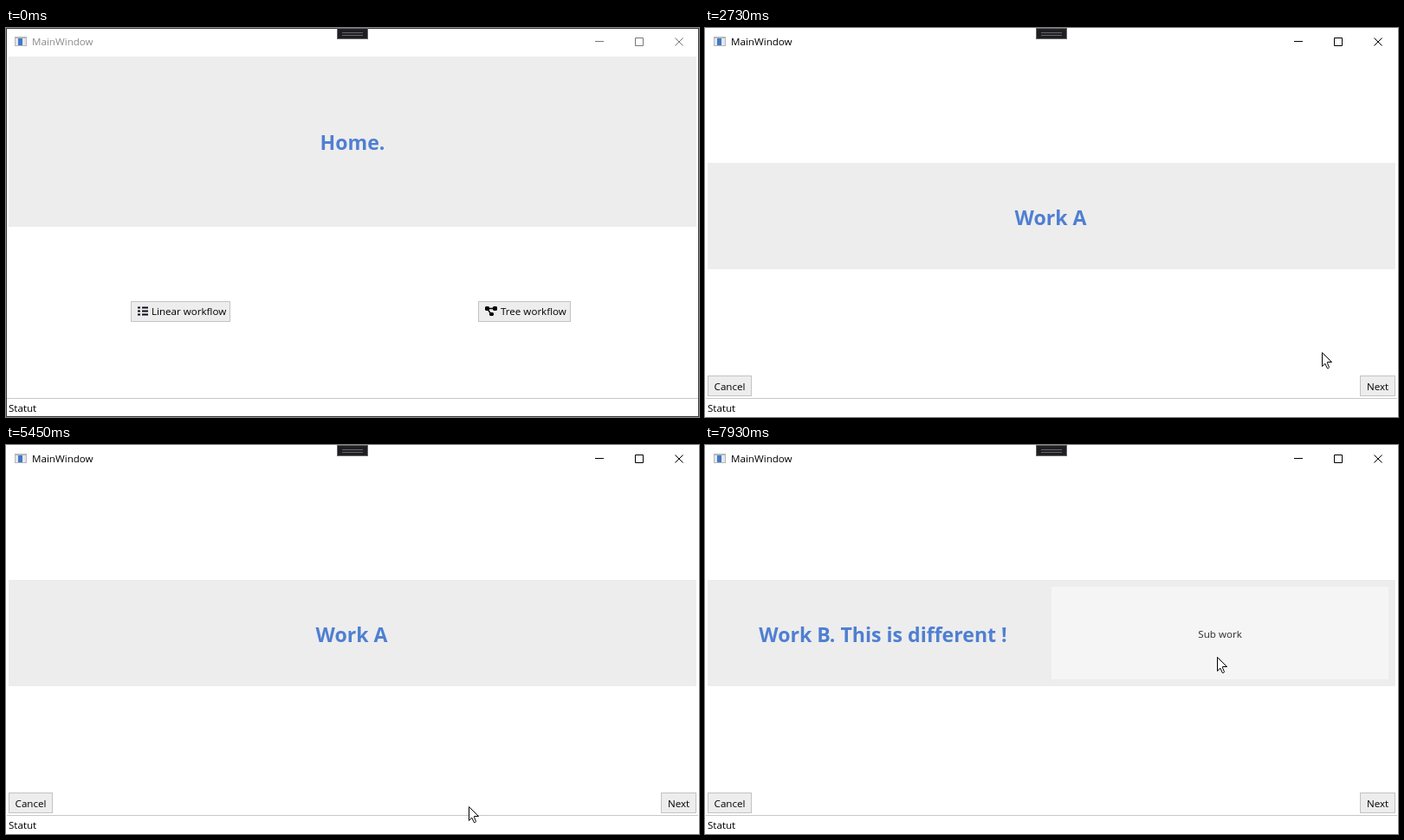
An HTML page that plays this animation: 800 by 450 pixels, repeating every 8 s.

```html
<!DOCTYPE html>
<html lang="en">
<head>
<meta charset="utf-8">
<title>Workflow demo</title>
<style>
  html, body { margin: 0; width: 100%; height: 100%; overflow: hidden; background: #fff; }
  svg { display: block; width: 800px; height: 450px; }
  text { font: 11.6px "Open Sans", "Noto Sans", sans-serif; fill: #000; }
  .mid { text-anchor: middle; }
  .head { font-size: 23.1px; font-weight: 700; fill: #4f7fd2; text-anchor: middle; }
  .panel { fill: #ededed; }
  .btn rect { fill: #ededed; stroke: #c3c3c3; }
  #sub rect { fill: #f5f5f5; }
  .btn.hover rect { fill: #fff; stroke: #4c7dcb; }
  .chrome { fill: none; stroke: #000; }
  .idle .chrome { stroke: #777; }
  .idle #title { fill: #8c8c8c; }
  #edge { display: none; fill: none; stroke: #3c3c41; }
  .idle #edge { display: inline; }
</style>
</head>
<body>
<svg id="stage" class="idle" viewBox="0 0 800 450">
  <rect width="800" height="450" fill="#fff"/>

  <!-- window frame -->
  <rect id="edge" x=".5" y=".5" width="799" height="449"/>
  <g shape-rendering="crispEdges">
    <rect x="10" y="10" width="14" height="11" fill="#b4b8bd"/>
    <rect x="11" y="12" width="12" height="8" fill="#e4e7ea"/>
    <rect x="14" y="12" width="5" height="8" fill="#4477c8"/>
  </g>
  <text id="title" x="30" y="20">MainWindow</text>
  <path class="chrome" d="M680 15.5h10M726.5 11.5h9v9h-9z"/>
  <path class="chrome" d="M772.5 11.5l9 9m0-9l-9 9"/>
  <rect x="382.5" y=".5" width="35" height="12" fill="#1f1f23" stroke="#666"/>
  <path d="M388 5.5h24M388 8.5h24" stroke="#66666a"/>
  <path d="M1 428.5h798" stroke="#c8c8c8"/>
  <text x="3" y="444">Statut</text>

  <g id="home">
    <rect class="panel" x="3" y="33" width="794" height="197"/>
    <text class="head" x="400" y="141">Home.</text>
    <g class="btn">
      <rect x="144.5" y="316.5" width="114" height="23"/>
      <path d="M152 323.5h3m2 0h7M152 327.5h3m2 0h7M152 331.5h3m2 0h7" stroke="#0c0c1c" stroke-width="2"/>
      <text x="168" y="332">Linear workflow</text>
    </g>
    <g class="btn">
      <rect x="545.5" y="316.5" width="106" height="23"/>
      <path d="M555 324.5h10M555.5 324.5l4.5 6.5" stroke="#000" stroke-width="1.4"/>
      <path d="M554 322h3l1 1v3l-1 1h-3l-1-1v-3zM563 322h3l1 1v3l-1 1h-3l-1-1v-3zM559 329h3l1 1v2l-1 1h-3l-1-1v-2z"/>
      <text x="571" y="332">Tree workflow</text>
    </g>
  </g>

  <g id="work">
    <rect class="panel" x="3" y="156" width="794" height="123"/>
    <g class="btn">
      <rect x="3.5" y="402.5" width="50" height="23"/>
      <text class="mid" x="28.5" y="419">Cancel</text>
    </g>
    <g class="btn">
      <rect x="756.5" y="402.5" width="40" height="23"/>
      <text class="mid" x="776.5" y="419">Next</text>
    </g>
    <text class="head" id="workA" x="399" y="228">Work A</text>
    <text class="head" id="workB" x="205.5" y="228">Work B. This is different !</text>
    <g class="btn" id="sub">
      <rect x="568.5" y="206.5" width="53" height="23"/>
      <text class="mid" x="595" y="223">Do sub</text>
    </g>
    <g id="subWork">
      <rect x="400" y="164" width="389" height="107" fill="#f5f5f5"/>
      <text class="mid" x="594.5" y="223" style="fill:#2a2a2a">Sub work</text>
    </g>
  </g>

  <g id="pointer">
    <circle id="press" r="12" fill="#f8f03c" opacity=".65"/>
    <path d="M.5 .5V16.5L3.8 13.2L6.3 18.5H7.8L8.5 17.5L6.3 12.2L6.5 11.5H11.5Z" fill="#fff" stroke="#000"/>
  </g>
</svg>
<script>
const LOOP = 8000, TICK = 70, ENTER = 650, ACTIVATE = 1600;
const $ = id => document.getElementById(id);

// Each move starts where the one before it ended; bend bows the path downwards.
const MOVES = [
  { start: ENTER, end: 1130, x: 612, y: 321, bend: 0 },
  { start: 1330, end: 1331, x: 611, y: 324, bend: 0 },
  { start: 2450, end: 3230, x: 782, y: 411, bend: 0 },
  { start: 3630, end: 4620, x: 45, y: 407, bend: -50 },
  { start: 5100, end: 5927, x: 778, y: 419, bend: 3 },
  { start: 6350, end: 7229, x: 591, y: 221, bend: 19 },
  { start: 7580, end: 7930, x: 591, y: 245, bend: 0 }
];

// A click shows its highlight from down to up, then opens the next screen.
const CLICKS = [
  { down: 1530, up: 1660, opens: "A" },
  { down: 3360, up: 3430, opens: "B" },
  { down: 4820, up: 4960, opens: "A" },
  { down: 6150, up: 6220, opens: "B" },
  { down: 7450, up: 7590, opens: "sub" }
];

const buttons = [...document.querySelectorAll(".btn")].map(el => {
  const { x, y, width, height } = el.querySelector("rect").getBBox();
  return { el, hit: (px, py) => px >= x && px <= x + width && py >= y && py <= y + height };
});

const easeOut = k => 1 - (1 - k) ** 2;
const show = (id, on) => { $(id).style.display = on ? "inline" : "none"; };

function pointerAt(t) {
  let x = 795, y = 337;
  for (const m of MOVES) {
    if (t < m.start) break;
    const ticked = Math.floor((t - m.start) / TICK) * TICK;
    const k = t >= m.end ? 1 : ticked / (m.end - m.start);
    x += (m.x - x) * easeOut(k);
    y += (m.y - y) * easeOut(k) + m.bend * Math.sin(Math.PI * k);
  }
  return [Math.round(x), Math.round(y)];
}

function draw(t) {
  const screen = CLICKS.findLast(c => t >= c.up)?.opens ?? "home";
  const [x, y] = pointerAt(t);
  const visible = t >= ENTER;

  $("stage").classList.toggle("idle", t < ACTIVATE);
  show("home", screen === "home");
  show("work", screen !== "home");
  show("workA", screen === "A");
  show("workB", screen === "B" || screen === "sub");
  show("sub", screen === "B");
  show("subWork", screen === "sub");
  show("pointer", visible);
  show("press", CLICKS.some(c => t >= c.down && t < c.up));
  $("pointer").setAttribute("transform", `translate(${x} ${y})`);
  for (const { el, hit } of buttons) el.classList.toggle("hover", visible && hit(x, y));
}

const start = performance.now();
function frame() {
  draw((performance.now() - start) % LOOP);
  requestAnimationFrame(frame);
}
frame();
</script>
</body>
</html>
```
